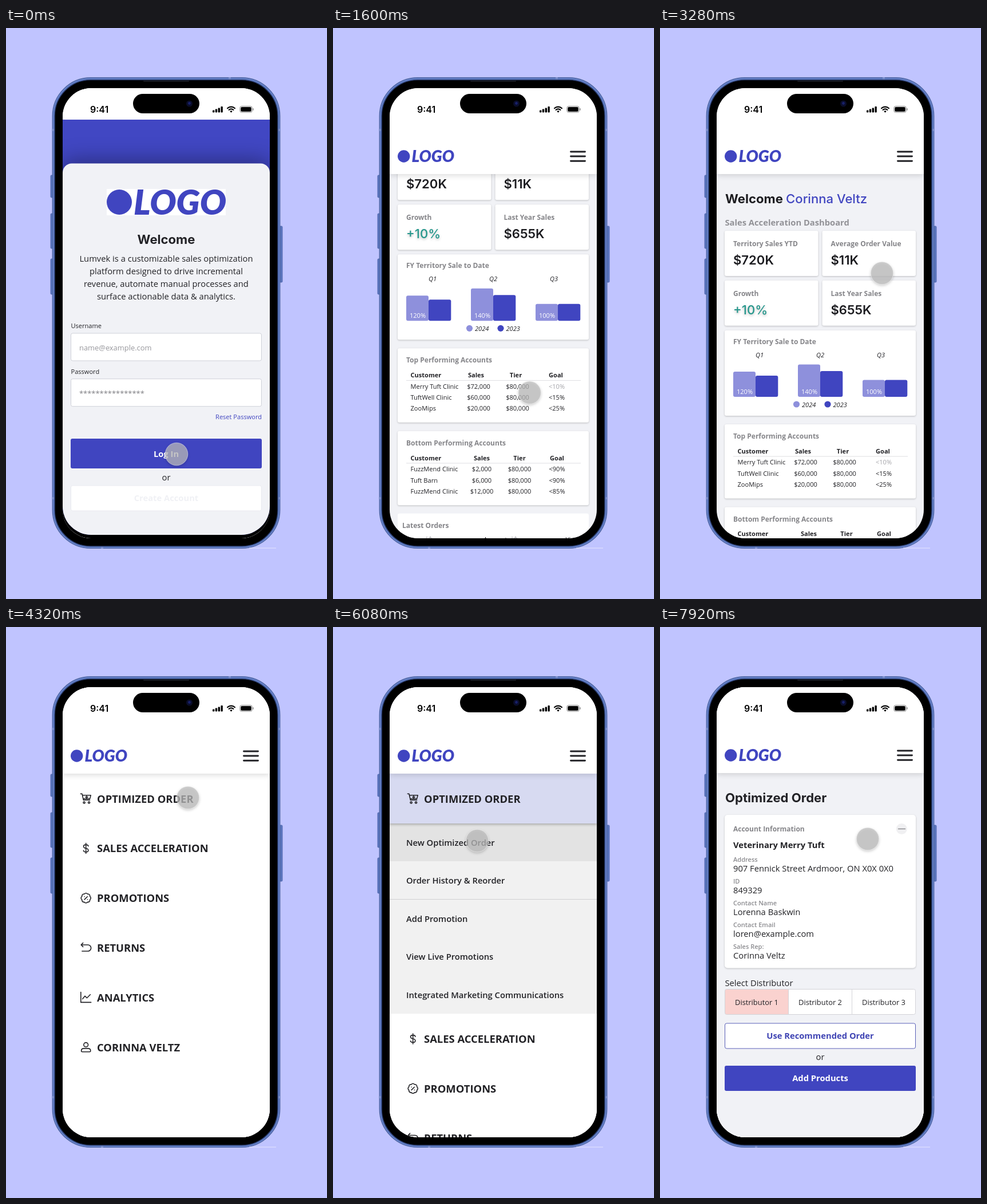
An HTML page for the animation above (8 s loop, 561 by 997 pixels).

```html
<!DOCTYPE html>
<html lang="en">
<head>
<meta charset="utf-8">
<title>Sales app walkthrough</title>
<style>
html, body { margin: 0; width: 100%; height: 100%; overflow: hidden; background: #c0c4ff; }
svg { display: block; width: 100vw; height: 100vh; font-family: "Open Sans", sans-serif; }
.ui { font-family: Inter, sans-serif; }
.logo { font-family: Lato, sans-serif; font-style: italic; }
.card { fill: #fff; filter: drop-shadow(0 1px 1.5px rgba(0,0,0,.22)); }
.bar { fill: #fff; filter: drop-shadow(0 3px 5px rgba(0,0,0,.13)); }
.sheet { filter: drop-shadow(0 -6px 18px rgba(0,0,0,.35)); }
.glow { filter: drop-shadow(0 2px 2px rgba(0,0,0,.25)); }
.line { fill: none; stroke-linecap: round; stroke-linejoin: round; }
</style>
</head>
<body>
<svg id="stage" viewBox="0 0 561 997" preserveAspectRatio="none"></svg>
<script>
const INK = '#222226', GRAY = '#858589', BLUE = '#4045c0', PALE = '#8e90dc', PAGE = '#f1f2f6';
const S = 11.05, H = 12, M = 12.9, L = 14.74, XL = 18.4, XXL = 22.1;   // type sizes
const PERSON = 'Corinna Veltz', CLINICS = ['Merry Tuft Clinic', 'TuftWell Clinic', 'ZooMips'];

const esc = s => s.replace(/&/g, '&amp;').replace(/</g, '&lt;');
const raw = (x, y, s, size, weight, fill, more = '') =>
  `<text x="${x}" y="${y}" font-size="${size}" font-weight="${weight}" fill="${fill}" ${more}>${s}</text>`;
const text = (x, y, s, size = S, weight = 400, fill = INK, more) => raw(x, y, esc(s), size, weight, fill, more);
const mid = (x, y, s, size, weight, fill, more = '') => text(x, y, s, size, weight, fill, more + ' text-anchor="middle"');
const rect = (x, y, w, h, fill, r = 0, more = '') =>
  `<rect x="${x}" y="${y}" width="${w}" height="${h}" rx="${r}" fill="${fill}" ${more}/>`;
const dot = (x, y, r, fill, more = '') => `<circle cx="${x}" cy="${y}" r="${r}" fill="${fill}" ${more}/>`;
const path = (d, color = INK, width = 1, more = '') =>
  `<path class="line" d="${d}" stroke="${color}" stroke-width="${width}" ${more}/>`;
const group = (id, body, more = '') => `<g id="${id}" ${more}>${body}</g>`;
const card = (x, y, w, h, r = 3) => rect(x, y, w, h, '#fff', r, 'class="card"');

function phone() {
  const side = (x, y, h) => rect(x, y, 5, h, '#5b76bf', 1.5, 'stroke="#4a60a6" stroke-width=".8"');
  const bands = [[80.5, 176, 5, 4], [474.5, 176, 5, 4], [80.5, 819, 5, 4], [474.5, 819, 5, 4], [389, 86, 4, 4], [166, 905, 4, 4]];
  return side(78, 257, 39) + side(78, 324, 61) + side(78, 403, 62) + side(478, 346, 98) +
    rect(81.2, 86.7, 397.6, 821.8, '#6480c8', 67, 'stroke="#4b629f" stroke-width="1.2"') +
    bands.map(b => rect(...b, '#7a8ecb')).join('') +
    rect(85, 90.5, 390, 814.5, '#000', 63, 'stroke="#2f4378" stroke-width="1.6"') +
    rect(240, 91.5, 80, 2.5, '#16181f', 1) + rect(425, 907.6, 47, 1, '#e3e5ff');
}

function status() {
  const bars = [4, 6, 8, 10.5].map((h, i) => rect(361 + i * 4.8, 147.5 - h, 3.4, h, '#000', 1)).join('');
  return rect(222, 115, 116, 34, '#000', 17) + dot(320.5, 132, 5.5, '#0a0d2a') + dot(320.5, 131.5, 2.4, '#18206a') +
    text(147, 147.5, '9:41', 16, 600, '#000', 'class="ui"') + bars +
    path('M387 140.2a9.4 9.4 0 0 1 13 0M389.6 143a5.6 5.6 0 0 1 7.8 0', '#000', 2.1) +
    path('M392.4 145.4h2.2l-1.1 1.2z', '#000', 1.6) +
    rect(408.7, 136.6, 21.6, 10.8, 'none', 3.2, 'stroke="#8a8a8a"') +
    rect(410.2, 138.1, 18.6, 7.8, '#000', 2) + rect(431.3, 140, 1.4, 4, '#8a8a8a', .7);
}

function header() {
  return rect(99, 100, 362, 155, '#fff', 0, 'class="bar"') + dot(123.7, 224, 10.7, BLUE) +
    text(137.5, 234.3, 'LOGO', 28, 900, BLUE, 'class="logo"') +
    path('M415.5 216h25M415.5 224h25M415.5 232.3h25', INK, 2.9);
}

function login() {
  const about = ['Lumvek is a customizable sales optimization', 'platform designed to drive incremental',
    'revenue, automate manual processes and', 'surface actionable data & analytics.'];
  const field = y => rect(113.5, y, 333, 48, '#fff', 3, 'stroke="#cfd1d9"');
  return rect(99, 160, 362, 740, '#4147c3') + rect(99, 236.5, 362, 700, PAGE, 16, 'class="sheet"') +
    rect(99, 105, 362, 55, '#fff') +
    rect(176, 281, 208, 46, '#fff') + dot(198, 304, 22, BLUE) +
    text(223, 326.3, 'LOGO', 61, 900, BLUE, 'class="logo"') +
    mid(280, 377, 'Welcome', XXL, 700, INK, 'class="ui"') +
    about.map((s, i) => mid(280, 408 + i * 22.1, s, L)).join('') +
    text(113.5, 523.5, 'Username') + field(533) + text(128, 562.5, 'name@example.com', M, 400, '#98989d') +
    text(113.5, 603.5, 'Password') + field(612.7) + text(128, 642.5, '*'.repeat(16), M, 400, '#808085') +
    text(447, 682.5, 'Reset Password', S, 400, BLUE, 'text-anchor="end"') +
    rect(113, 717, 334, 52, BLUE, 3) + mid(280, 749, 'Log In', L, 700, '#fff') +
    mid(280, 789.5, 'or', L) + rect(113.5, 799, 333, 44, '#fff', 3, 'stroke="#e9eaf0"') +
    mid(280, 826, 'Create Account', L, 700, '#f0f1f5');
}

function table(y, title, heads, cells, rows) {
  return card(113, y, 334, 129.5) + text(128, y + 25, title, H, 700, GRAY) +
    text(135.5, y + 50.7, 'Customer', S, 700) +
    ['Sales', 'Tier', 'Goal'].map((s, i) => mid(heads[i], y + 50.7, s, S, 700)).join('') +
    rect(128, y + 55.5, 305, 1, '#dedee2') +
    rows.map(([name, sales, goal, tint], i) => {
      const b = y + 70.3 + i * 19.4;
      return text(135.5, b, name) + mid(cells[0], b, sales) + mid(cells[1], b, '$80,000') + mid(cells[2], b, goal, S, 400, tint);
    }).join('');
}

function orders(y) {
  const sort = x => path(`M${x} ${y + 40.5}v9m-2.3 -2.3l2.3 2.3l2.3 -2.3M${x + 6} ${y + 49.5}v-9m-2.3 2.3l2.3 -2.3l2.3 2.3`, '#a0a0a5');
  const eye = c => path(`M409.5 ${c}q9 -13 18 0q-9 13 -18 0z`, '#98989d', 1.3) + dot(418.5, c, 2.8, 'none', 'stroke="#98989d" stroke-width="1.3"');
  return rect(113, y, 334, 159, '#fff', 3) + text(121, y + 25, 'Latest Orders', H, 700, GRAY) +
    text(124.5, y + 49.5, 'Name') + sort(164) + text(263, y + 49.5, 'Amount') + sort(313) + text(406.5, y + 49.5, 'View') +
    rect(121, y + 55, 319, 1, '#c9c9ce') +
    ['$149.99', '$250.98', '$199.54'].map((sum, i) => {
      const b = y + 75.5 + i * 29.5;
      return text(124.5, b, CLINICS[i]) + text(263, b, sum) + eye(b - 4.5) + (i < 2 ? rect(121, b + 9.5, 319, 1, '#f2f2f4') : '');
    }).join('');
}

function dashboard() {
  const stats = [['Territory Sales YTD', '$720K'], ['Average Order Value', '$11K'], ['Growth', '+10%'], ['Last Year Sales', '$655K']];
  const tiles = stats.map(([name, value], i) => {
    const x = 113 + i % 2 * 170.5, y = 354 + (i >> 1) * 86.8, up = i === 2;
    return card(x, y, 163.5, 79) + text(x + 15, y + 27, name, H, 700, GRAY) +
      text(x + 15, y + 59, value, XXL, up ? 500 : 600, up ? '#26978c' : '#1c1c20', `class="ui${up ? ' glow' : ''}"`);
  }).join('');
  const bars = [[128, 44, 37, '120%'], [241, 56.5, 45, '140%'], [354, 29.5, 29.5, '100%']].map(([x, a, b, s], i) =>
    mid(174 + i * 106, 575, 'Q' + (i + 1), S, 400, INK, 'font-style="italic"') +
    rect(x, 644 - a, 39, a, PALE, 3) + rect(x + 39, 644 - b, 39.3, b, BLUE, 3) + mid(x + 20, 638.7, s, S, 400, '#fff')).join('');
  const key = (x, fill, year) => dot(x, 657, 5.6, fill) + text(x + 9.5, 661.5, year, S, 400, INK, 'font-style="italic"');
  return raw(114, 306, `Welcome <tspan font-weight="500" fill="${BLUE}">${PERSON}</tspan>`, XXL, 700, '#1c1c20', 'class="ui"') +
    text(113.5, 344.5, 'Sales Acceleration Dashboard', L, 700, '#929297') + tiles +
    card(113, 528, 334, 149) + text(128, 552, 'FY Territory Sale to Date', H, 700, GRAY) + bars +
    key(238.5, PALE, '2024') + key(293, BLUE, '2023') +
    table(692, 'Top Performing Accounts', [250, 319.5, 389.5], [254.5, 322.5, 391], [
      [CLINICS[0], '$72,000', '<10%', '#a5a5aa'], [CLINICS[1], '$60,000', '<15%'], [CLINICS[2], '$20,000', '<25%']]) +
    table(836.5, 'Bottom Performing Accounts', [260, 326, 391.5], [260, 326, 391.5], [
      ['FuzzMend Clinic', '$2,000', '<90%'], ['Tuft Barn', '$6,000', '<90%'], ['FuzzMend Clinic', '$12,000', '<85%']]) +
    orders(980.5);
}

const icons = [
  'M1 2h3l3 13h13M5 5h17l-2 7.5H6.5M13.5 6.5v5M11 9h5M6.5 20a1.8 1.8 0 1 0 3.6 0a1.8 1.8 0 1 0-3.6 0M16.5 20a1.8 1.8 0 1 0 3.6 0a1.8 1.8 0 1 0-3.6 0',
  'M12 1.5v21M17 7.5c-.5-2-2.5-3-5-3c-6.5 0-6.5 6.5 0 7.5s6.5 7.5 0 7.5c-2.5 0-4.5-1-5-3',
  'M3.85 8.6a4 4 0 0 1 4.8-4.8a4 4 0 0 1 6.7 0a4 4 0 0 1 4.8 4.8a4 4 0 0 1 0 6.8a4 4 0 0 1-4.8 4.8a4 4 0 0 1-6.7 0a4 4 0 0 1-4.8-4.8a4 4 0 0 1 0-6.8zM15 9l-6 6M9 9h.1M15 15h.1',
  'M6 2L2 6l4 4M2 6h14a6.5 6.5 0 0 1 0 13H4',
  'M1.5 1v21h21M5 15l5-6l4 4l7-7',
  'M7.5 7a4.5 4.5 0 1 0 9 0a4.5 4.5 0 1 0-9 0M2.5 19.5c0-3 2-5 5-5h9c3 0 5 2 5 5c0 1.5-1 2-2 2h-15c-1 0-2-.5-2-2z'];

function menu() {
  const names = ['OPTIMIZED ORDER', 'SALES ACCELERATION', 'PROMOTIONS', 'RETURNS', 'ANALYTICS', PERSON.toUpperCase()];
  const subs = ['New Optimized Order', 'Order History & Reorder', 'Add Promotion', 'View Live Promotions', 'Integrated Marketing Communications'];
  const item = (s, i) => {
    const y = 300 + i * 86.8;
    return path(icons[i], INK, 1.9, `transform="translate(129.5 ${y - 10.5}) scale(.85)"`) + text(159, y + 6.5, s, XL, 700);
  };
  return rect(99, 100, 362, 800, '#fff') +
    group('sub', rect(99, 343, 362, 332.5, '#f1f1f1') + rect(99, 343, 362, 66, '#e3e3e3', 0, 'id="hover"') +
      rect(99, 475, 362, 1, '#cfcfd2') + subs.map((s, i) => text(128, 381.5 + i * 66.5, s, L, 600)).join('')) +
    group('rest', rect(99, 343, 362, 600, '#fff') + names.map((s, i) => i ? item(s, i) : '').join('')) +
    rect(99, 250, 362, 93, '#d7daf1', 0, 'id="active" class="glow"') + item(names[0], 0);
}

function order() {
  const facts = [['Address', '907 Fennick Street Ardmoor, ON X0X 0X0'], ['ID', '849329'], ['Contact Name', 'Lorenna Baskwin'],
    ['Contact Email', 'loren@example.com'], ['Sales Rep:', PERSON]];
  return rect(99, 100, 362, 800, PAGE) + text(114, 306, 'Optimized Order', XXL, 700, INK, 'class="ui"') +
    card(113, 328, 334, 267.5, 5) + text(128, 357, 'Account Information', H, 700, GRAY) +
    dot(422.3, 352.5, 9.5, '#f0f0f2') + path('M416.5 352.5h12', '#8a8a8e', 1.5) +
    text(128, 386, 'Veterinary Merry Tuft', L, 700) +
    facts.map(([k, v], i) => text(128, 410 + i * 37.9, k, S, 600, '#8a8a8e') + text(128, 427 + i * 37.9, v, L)).join('') +
    text(113.5, 627, 'Select Distributor', L) + rect(113.5, 632.5, 333, 44, '#fff', 3) + rect(113.5, 632.5, 111, 44, '#fad2cf', 3) +
    rect(113.5, 632.5, 333, 44, 'none', 3, 'stroke="#d3d3d8"') + path('M224.5 633v43M335.5 633v43', '#d3d3d8') +
    [1, 2, 3].map(n => mid(58 + n * 111, 660, 'Distributor ' + n, M)).join('') +
    rect(113.5, 692, 333, 44, '#fff', 3, 'stroke="#5a60b8"') + mid(280, 719, 'Use Recommended Order', L, 700, '#4045b4') +
    mid(280, 756, 'or', L) + rect(113, 766, 334, 44, BLUE, 3) + mid(280, 793, 'Add Products', L, 700, '#fff');
}

const clip = (id, h) => `<clipPath id="${id}">${rect(99, 105, 362, h, '#fff', 50)}</clipPath>`;
document.getElementById('stage').innerHTML = `<defs>${clip('screen', 786)}${clip('short', 780)}</defs>` +
  rect(0, 0, 561, 997, '#c0c4ff') + phone() +
  group('app', rect(99, 100, 362, 800, PAGE) + group('dash', dashboard()) + group('menu', menu()) +
    group('order', order()) + group('head', header()), 'clip-path="url(#screen)"') +
  group('login', rect(99, 800, 362, 100, '#000') + group('form', login(), 'clip-path="url(#short)"'), 'clip-path="url(#screen)"') +
  status() + dot(0, 0, 19.8, '#bfbfbf', 'id="touch" class="glow" fill-opacity=".72" stroke="#fff" stroke-opacity=".45"');

const $ = Object.fromEntries([...document.querySelectorAll('g[id], #hover, #active, #touch')].map(e => [e.id, e]));
const ramp = (t, a, b) => { const u = Math.min(1, Math.max(0, (t - a) / (b - a))); return u * u * (3 - 2 * u); };
const stops = [[0, 298, 744], [240, 298, 744], [960, 348, 574], [1200, 348, 574], [2080, 338, 719], [2320, 338, 719],
  [3200, 388, 428], [3360, 388, 428], [3760, 428, 224], [3960, 428, 224], [4320, 318, 298], [4800, 318, 298],
  [5520, 252, 373], [6240, 252, 373], [6960, 363, 370], [8000, 363, 370]];

function show(id, alpha) {
  $[id].style.display = alpha > 0 ? '' : 'none';
  $[id].setAttribute('opacity', alpha);
}
const move = (id, x, y) => $[id].setAttribute('transform', `translate(${x} ${y})`);

function draw(t) {
  const opened = ramp(t, 3840, 4080), grown = ramp(t, 4720, 5040), ordered = ramp(t, 6240, 6480);
  show('login', 1 - ramp(t, 160, 480));
  show('menu', opened);
  show('order', ordered);
  show('sub', grown > 0 ? 1 : 0);
  show('active', grown);
  show('hover', ramp(t, 5200, 5360));
  move('dash', 0, -307 * (ramp(t, 1200, 2080) - ramp(t, 2320, 3120)));
  move('rest', 0, 332.5 * grown);
  move('head', 0, opened - ordered);
  const i = stops.findIndex(s => s[0] > t), [a, x, y] = stops[i - 1], [b, x2, y2] = stops[i], k = ramp(t, a, b);
  move('touch', x + (x2 - x) * k, y + (y2 - y) * k);
}

const start = performance.now();
function tick() {
  const t = Math.max(0, performance.now() - start) % 8000;
  draw(Math.floor(t / 80) * 80);
  requestAnimationFrame(tick);
}
tick();
</script>
</body>
</html>
```
